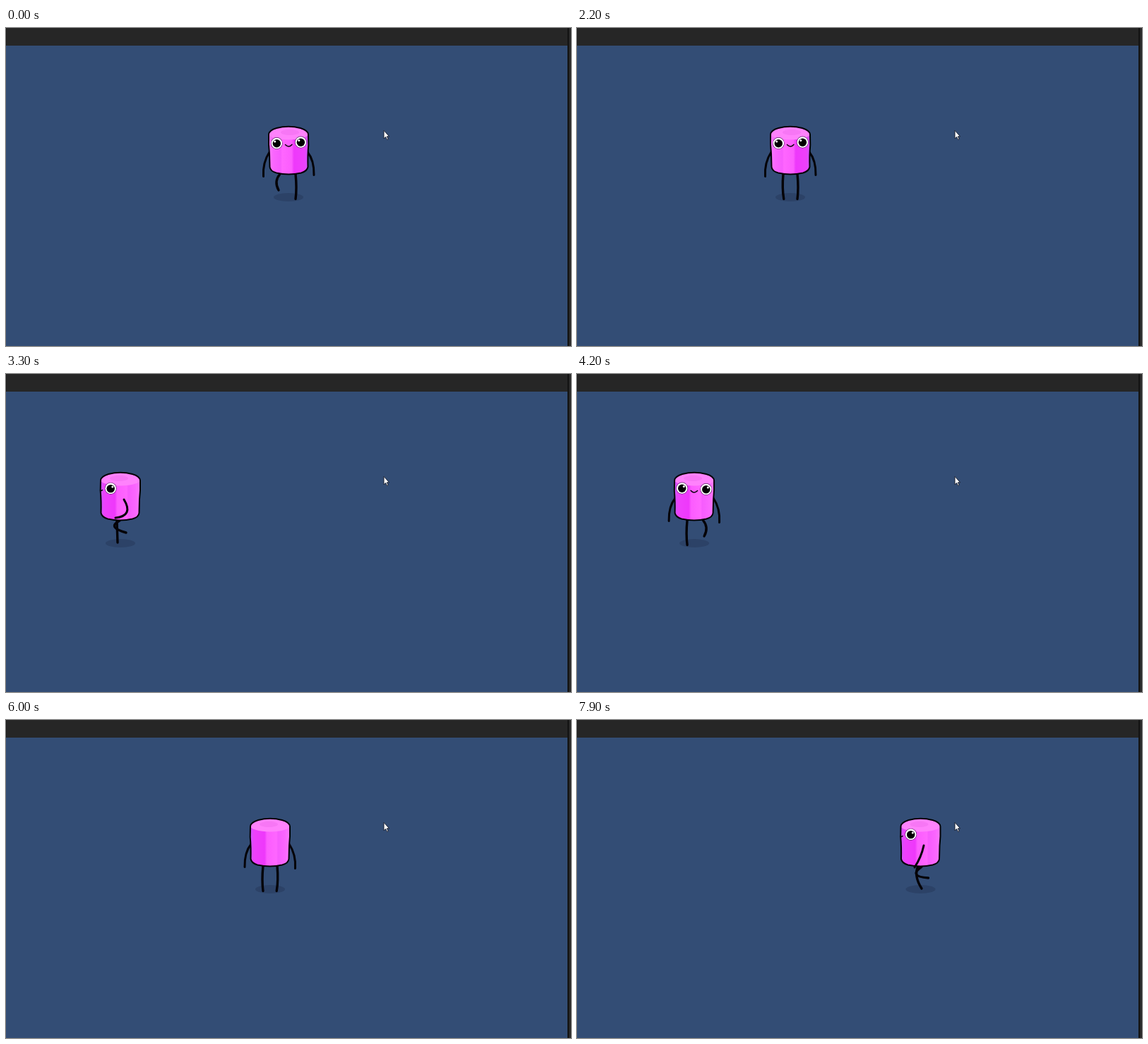
An HTML page with a canvas that plays this animation: 800x451 px, repeating every 8000 ms.

```html
<!DOCTYPE html>
<html lang="en">
<head>
<meta charset="utf-8">
<title>Walking marshmallow</title>
<style>
html, body { margin: 0; width: 100%; height: 100%; overflow: hidden; background: #334d75; }
canvas { display: block; }
</style>
</head>
<body>
<canvas width="800" height="451"></canvas>
<script>
const ctx = document.querySelector('canvas').getContext('2d');
const LOOP = 8000, STEP = 100;

// start, end, x from, x to, view, facing, step offset
const WALK = [
  [0, 300, 400, 400, 'front', 1, 0],
  [300, 700, 400, 400, 'idle', 1, 0],
  [700, 1400, 400, 400, 'back', 1, 0],
  [1400, 2500, 406, 263, 'front', 1, 1],
  [2500, 3500, 266, 136, 'side', -1, 1],
  [3500, 4500, 157, 170, 'front', -1, 0],
  [4500, 5200, 171.5, 266, 'side', 1, 4],
  [5200, 6300, 266, 414.5, 'back', -1, 2],
  [6300, 7300, 414.5, 545, 'front', -1, 1],
  [7300, 7700, 538, 490, 'back', 1, 0],
  [7700, 7900, 490, 490, 'front', 1, 0],
  [7900, 8000, 486.5, 486.5, 'side', -1, 0]
];

// Limbs are start, middle and end points, relative to the body centre.
const STRIDE_LEGS = [[0, 208, -9, 219, -19, 229], [0, 208, 11, 221, 22, 233]];
const STRIDE_BACK = { dip: 6, arm: [-4, 177, -18, 185, -29, 202], legs: STRIDE_LEGS };
const STRIDE_FORE = { dip: 6, arm: [-5, 178, -6, 194, 12, 202], legs: STRIDE_LEGS };
const PASS_LOW = { dip: 0, arm: [-4.5, 178, .5, 194, 8.5, 209],
  legs: [[3.5, 207, 5.5, 222, -1.5, 239], [-1.5, 208, 6, 219, -11, 224]] };
const PASS_HIGH = { dip: 0, arm: [-5, 178, -9, 196, 7, 204],
  legs: [[5, 208, 4.5, 224, 4, 239], [1, 208, 8, 217, -8, 225]] };
const SIDE_CYCLE = [STRIDE_BACK, PASS_LOW, PASS_HIGH, STRIDE_FORE, PASS_HIGH, PASS_LOW];
const LIFT_CYCLE = [1, .5, 0, -1, -.5, 0];

const BODY = new Path2D('M-28 151Q-27.5 145-17 142Q0 137.5 17 142Q28 145.5 28 151' +
  'L28.3 166Q27 180 27.5 197Q26.5 203 18 205.5Q0 209.5-17 205.5Q-26 203-26.5 197L-27 178Q-28.5 165-28 151Z');
const CURSOR = new Path2D('M535 145.3V156.8L537.6 154.4L539.5 158.4L541.2 157.6L539.4 153.8H542.6Z');

function limb([x1, y1, mx, my, x2, y2], width) {
  ctx.beginPath();
  ctx.moveTo(x1, y1);
  ctx.quadraticCurveTo(2 * mx - (x1 + x2) / 2, 2 * my - (y1 + y2) / 2, x2, y2);
  ctx.lineWidth = width;
  ctx.stroke();
}

function oval(x, y, rx, ry, color) {
  ctx.beginPath();
  ctx.ellipse(x, y, rx, ry, 0, 0, 7);
  ctx.fillStyle = color;
  ctx.fill();
}

function eye(x, y) {
  oval(x, y, 8.4, 8.4, '#60206a');
  oval(x, y, 7.8, 7.8, '#fff');
  oval(x, y + .3, 5.7, 5.7, '#000');
  oval(x - 2.6, y - 2.4, 1.5, 1.5, '#fff');
}

const mix = (a, b, p) => a.map((v, i) => v + (b[i] - v) * p);

function frontLimbs(lift) {
  const left = mix([-10, 207, -10.7, 226, -9.2, 242.5], [-12, 207, -17, 218, -14, 230], Math.max(lift, 0));
  const right = mix([10, 207, 11, 226, 10, 242.5], [12, 207, 17, 218, 14, 230], Math.max(-lift, 0));
  limb(left, 3.4);
  limb(right, 3.4);
  limb([-27, 176, -34, 192, -35.5, 210.5], 3);
  limb([27, 176, 34, 190, 36, 208.5], 3);
}

const shade = ctx.createLinearGradient(-28, 0, 28, 0);
[[0, '#fb7cff'], [.12, '#fa66fe'], [.3, '#f65cfd'], [.34, '#ff66ff'], [.58, '#fb5cfe'],
 [.64, '#ee38fb'], [.9, '#ee40fb'], [1, '#cc58fa']].forEach(([p, c]) => shade.addColorStop(p, c));

function body(view) {
  ctx.save();
  ctx.clip(BODY);
  ctx.fillStyle = shade;
  ctx.fillRect(-30, 135, 60, 76);
  oval(0, 149, 29, 9.5, '#ff82fc');
  oval(2, 148, 13, 4, '#f777f5');
  ctx.restore();
  ctx.lineWidth = 2;
  ctx.stroke(BODY);
  if (view === 'back') return;
  if (view === 'side') {
    eye(13.8, 162.3);
    limb([25.5, 164.5, 27, 165.4, 28.5, 165], 1.5);
  } else {
    eye(-16.7, 163.5);
    eye(17.4, 162);
    limb([-4.5, 165.5, .5, 168, 5, 165.3], 1.5);
  }
}

function character(t) {
  const [start, end, from, to, view, facing, offset] = WALK.find(s => t < s[1]);
  const step = (t / STEP + offset) % 6;
  const pose = view === 'side' ? SIDE_CYCLE[step] : { dip: 0 };
  ctx.save();
  ctx.translate(from + (to - from) * (t - start) / (end - start), 0);
  if (!pose.dip) oval(0, 240, 21, 6, '#2c4267');
  ctx.scale(facing, 1);
  ctx.translate(0, pose.dip);
  ctx.strokeStyle = '#050308';
  ctx.lineCap = ctx.lineJoin = 'round';
  if (view === 'side') pose.legs.forEach(leg => limb(leg, 3.4));
  else frontLimbs(view === 'idle' ? 0 : LIFT_CYCLE[step]);
  body(view);
  if (pose.arm) limb(pose.arm, 3);
  ctx.restore();
}

function rect(x, y, w, h, color) {
  ctx.fillStyle = color;
  ctx.fillRect(x, y, w, h);
}

function draw(t) {
  rect(0, 0, 800, 451, '#334d75');
  rect(0, 0, 800, 25, '#262626');
  rect(0, 0, 1, 25, '#1c1c1c');
  character(t);
  rect(795, 0, 2, 451, '#121212');
  rect(797, 0, 3, 451, '#2a2a2a');
  ctx.fillStyle = '#fff';
  ctx.strokeStyle = '#1a2030';
  ctx.lineWidth = 1;
  ctx.fill(CURSOR);
  ctx.stroke(CURSOR);
}

const began = performance.now();
function tick() {
  const t = (performance.now() - began) % LOOP;
  draw(Math.floor(t / STEP) * STEP);
  requestAnimationFrame(tick);
}
tick();
</script>
</body>
</html>
```
